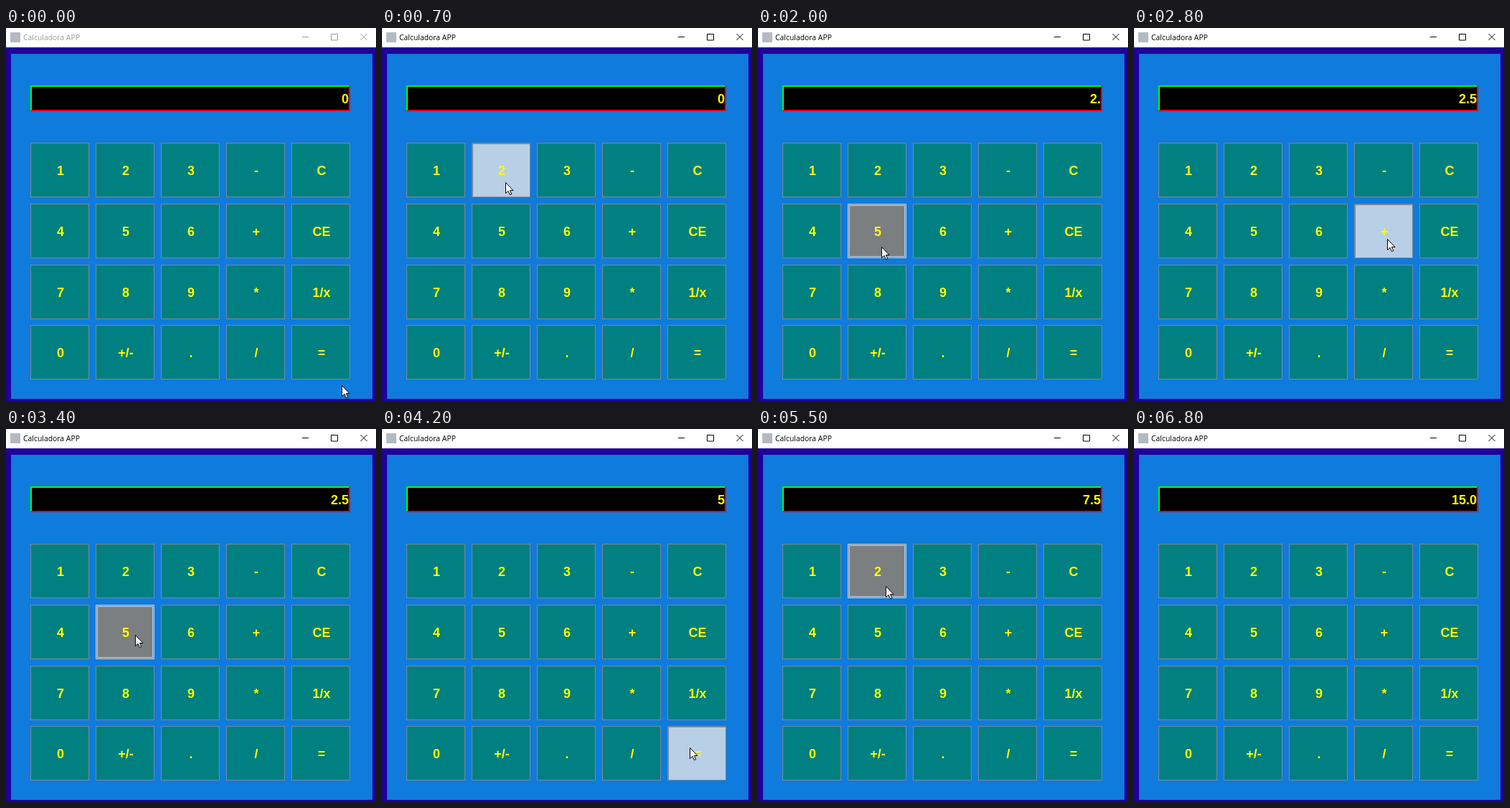
An HTML page for the animation above (7200 ms loop, 516 by 520 pixels).

```html
<!DOCTYPE html>
<html lang="es">
<head>
<meta charset="utf-8">
<title>Calculadora APP</title>
<style>
html, body { margin: 0; width: 100%; height: 100%; overflow: hidden; }
svg { display: block; width: 100%; height: 100%; }
rect { shape-rendering: crispEdges; }
.title { font: 10.4px "Open Sans", "Noto Sans", sans-serif; }
.label { font: bold 18px "Liberation Sans", Arial, sans-serif; fill: #ff0; }
</style>
</head>
<body>
<svg id="stage" viewBox="0 0 516 520"></svg>
<script>
const LOOP = 7200, STEP = 100;
const BEAT = 700, HOLD = 200, LEAD = 100; // time between clicks, press length, pause before a click
const W = 82, H = 76, MARGIN = 12;
const LIGHT = '#b8cfe5', EDGE = '#7a8a99';
const stage = document.getElementById('stage');

function add(tag, attrs, parent = stage) {
  const el = document.createElementNS('http://www.w3.org/2000/svg', tag);
  for (const k in attrs) el.setAttribute(k, attrs[k]);
  parent.appendChild(el);
  return el;
}
const box = (x, y, width, height, fill, parent) =>
  add('rect', { x, y, width, height, fill }, parent);
const frame = (inset, stroke, parent) => add('rect', {
  x: inset + .5, y: inset + .5, width: W - 1 - 2 * inset, height: H - 1 - 2 * inset,
  fill: 'none', stroke
}, parent);
function write(str, x, y, anchor, cls, parent) {
  const el = add('text', { x, y, 'text-anchor': anchor, class: cls }, parent);
  el.textContent = str;
  return el;
}
const show = (el, on) => el.setAttribute('visibility', on ? 'inherit' : 'hidden');
const clamp = (v, lo, hi) => Math.min(hi, Math.max(lo, v));

// Window
box(0, 0, 516, 520, '#1e0098');
box(0, 0, 516, 27, '#fff');
box(7, 36, 504, 481, '#0f7bdc');
box(6, 6, 14, 14, '#b3bac2');
const title = write('Calculadora APP', 24, 17, 'start', 'title');
const controls = add('path', {
  d: 'M413 12.5h9M453.5 8.5h9v8.5h-9zM494.5 8l9 9M503.5 8l-9 9', fill: 'none'
});

// Display
box(34, 80, 446, 36, '#000');
add('path', { d: 'M34 116V80H480L478 82H36V114Z', fill: '#0f0' });
add('path', { d: 'M34 116H480V80L478 82V114H36Z', fill: '#f00' });
const display = write('0', 478, 105, 'end', 'label');

// Keys
const ROWS = ['1 2 3 - C', '4 5 6 + CE', '7 8 9 * 1/x', '0 +/- . / ='];
const keys = ROWS.flatMap((row, r) => row.split(' ').map((name, c) => {
  const x = 34 + c * 91, y = Math.round(160.4 + r * 254 / 3);
  const g = add('g', { transform: `translate(${x} ${y})` });
  const face = box(0, 0, W, H, '#008080', g);
  frame(0, EDGE, g);
  const over = add('g', {}, g);
  [LIGHT, EDGE, LIGHT].forEach((color, i) => frame(i, color, over));
  const down = add('g', {}, g);
  box(0, 0, W, 2, EDGE, down);
  box(0, 0, 2, H, EDGE, down);
  write(name, W / 2 + 1, 45, 'middle', 'label', g);
  return { name, x, y, face, over, down };
}));

const cursor = add('path', {
  d: 'M.5 .5V15.5L4 12.2L6.4 17.6L8.8 16.6L6.4 11.4H11Z',
  fill: '#fff', stroke: '#000', 'stroke-linejoin': 'round'
});

// One click per beat; each aim is where the pointer pauses before that click
const CLICKS = [...'2.5+5=*2='];
const START = [468, 498], EXIT = [570, 432];
const AIMS = [
  [172, 215], [312, 479], [172, 305], [353, 294], [180, 287],
  [429, 444], [352, 379], [178, 219], [432, 460], EXIT
];

// The click lands at the aim, pulled inside its key
const hits = CLICKS.map((name, i) => {
  const key = keys.find(k => k.name === name), [x, y] = AIMS[i];
  return [
    clamp(x, key.x + MARGIN, key.x + W - MARGIN),
    clamp(y, key.y + MARGIN, key.y + H - MARGIN)
  ];
});

function pointer(t) {
  const i = Math.floor(t / BEAT), time = t - i * BEAT;
  const from = i ? hits[i - 1] : START, to = AIMS[i];
  const k = clamp((time - HOLD) / (BEAT - HOLD - LEAD), 0, 1);
  const ease = k * k * (3 - 2 * k);
  return from.map((v, n) => Math.round(v + (to[n] - v) * ease));
}

const asDouble = n => Number.isInteger(n) ? n.toFixed(1) : String(n);
const MATH = { '+': (a, b) => a + b, '*': (a, b) => a * b };

function calculate(names) {
  let text = '0', fresh = true, total = 0, op = '=';
  for (const name of names) {
    if (/[\d.]/.test(name)) {
      text = fresh ? name : text + name;
      fresh = false;
    } else {
      total = MATH[op] ? MATH[op](total, Number(text)) : Number(text);
      text = asDouble(total);
      op = name;
      fresh = true;
    }
  }
  return text;
}

function render(ms) {
  const t = Math.floor(ms % LOOP / STEP) * STEP;
  const beat = Math.min(Math.floor(t / BEAT), CLICKS.length);
  const held = beat > 0 && t - beat * BEAT < HOLD;
  const [px, py] = t < BEAT * AIMS.length ? pointer(t) : EXIT;
  const ink = beat ? '#000' : '#999';

  title.setAttribute('fill', ink);
  controls.setAttribute('stroke', ink);
  display.textContent = calculate(CLICKS.slice(0, held ? beat - 1 : beat));

  for (const k of keys) {
    const inside = px >= k.x && px < k.x + W && py >= k.y && py < k.y + H;
    const pressed = inside && held;
    k.face.setAttribute('fill', pressed ? LIGHT : inside ? '#7b7f80' : '#008080');
    show(k.over, inside && !pressed);
    show(k.down, pressed);
  }
  cursor.setAttribute('transform', `translate(${px} ${py})`);
}

const start = performance.now();
function tick() {
  render(performance.now() - start);
  requestAnimationFrame(tick);
}
tick();
</script>
</body>
</html>
```
